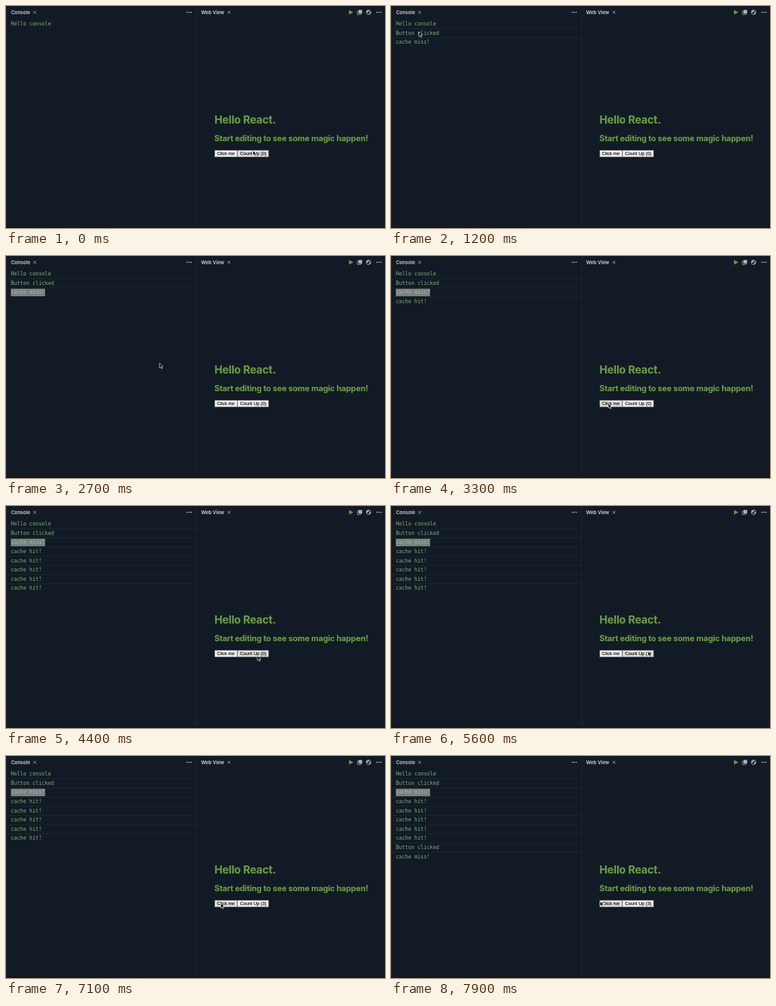
Animation of 600 by 353 pixels, one loop 8 s. Source, as an HTML page:

```html
<!DOCTYPE html>
<html lang="en">
<head>
<meta charset="utf-8">
<title>Console and web view</title>
<style>
  html, body { margin: 0; width: 100%; height: 100%; overflow: hidden; background: #121b25; }
  svg { display: block; width: 600px; height: 353px; }
  text { white-space: pre; }
  .tab { font: 600 7.6px Inter, sans-serif; fill: #ccd3d8; }
  .log { font: 8.15px "DejaVu Sans Mono", monospace; fill: #7fb074; }
  .page { font-family: Inter, sans-serif; font-weight: 700; font-optical-sizing: none; letter-spacing: -.12px; fill: #6a9c41; stroke: #6a9c41; stroke-width: .15; }
  .label { font: 7.3px "Liberation Sans", Arial, sans-serif; fill: #000; stroke: #000; stroke-width: .12; }
  .button { fill: #efefef; stroke: #6c6c6c; stroke-width: .7; }
  .button.hover { fill: #dfdfdf; }
  .icon { fill: #a9b4bc; }
  .stroke { fill: none; stroke: #a9b4bc; stroke-width: .9; }
</style>
</head>
<body>
<svg viewBox="0 0 600 353">
  <defs>
    <path id="close" class="stroke" d="M-2.3-2.3 2.3 2.3M2.3-2.3-2.3 2.3"/>
    <g id="more" class="icon">
      <circle cx="-3.2" r="1"/><circle r="1"/><circle cx="3.2" r="1"/>
    </g>
  </defs>
  <rect width="600" height="353" fill="#121b25"/>
  <path d="M.5 0V351M302 0V351" stroke="#1a2630"/>
  <rect y="351" width="600" height="2" fill="#0f161e"/>

  <text class="tab" x="8" y="12.8">Console</text>
  <use href="#close" x="45.5" y="10"/>
  <use href="#more" x="290" y="10"/>
  <text class="tab" x="308.7" y="12.8">Web View</text>
  <use href="#close" x="353" y="10"/>
  <use href="#more" x="590.5" y="10"/>
  <path d="M543 6.2 550 10 543 13.8Z" fill="#629a3c"/>
  <path class="stroke" d="M557.5 8H556.3V13.6H562V12.4"/>
  <rect class="icon" x="558" y="6.3" width="5.8" height="5.7"/>
  <circle class="stroke" cx="574" cy="10" r="3.7"/>
  <path class="icon" d="M571 8 574.2 6.6 575 8.4 573 9.6 572.4 11 571 10.2ZM575 10 577.4 9.2 576.6 12 574.6 13Z"/>

  <g id="logs"></g>

  <text class="page" x="330" y="187" font-size="16.9">Hello React.</text>
  <text class="page" x="330" y="215" font-size="12.65">Start editing to see some magic happen!</text>
  <rect id="click" class="button" x="330.4" y="229.4" width="35.6" height="10.6"/>
  <rect id="count" class="button" x="366.4" y="229.4" width="49.4" height="10.6"/>
  <text class="label" x="334.1" y="237">Click me</text>
  <text id="total" class="label" x="370.4" y="237">Count Up (0)</text>

  <g id="pointer">
    <g id="ring" fill="none" stroke="#fff">
      <circle cx=".5" cy="1.5" r="10.6" stroke-width=".8" stroke-opacity=".8"/>
      <circle cx=".5" cy="1.5" r="8.4" stroke-width=".7" stroke-opacity=".65"/>
    </g>
    <path d="M0 0V7.6L1.8 6 3.1 8.9 4.5 8.3 3.2 5.5H5.6Z" fill="#000" stroke="#fff" stroke-width=".7" stroke-linejoin="round"/>
  </g>
</svg>
<script>
const LOOP = 8000, STEP = 100, PITCH = 14.6;
const $ = id => document.getElementById(id);

// time, x, y of the pointer tip
const path = [
  [0, 391, 230], [100, 388, 230], [400, 347, 234], [900, 346, 234],
  [1200, 44, 41], [1500, 47, 46], [1800, 57, 53], [2400, 57, 53],
  [2900, 344, 234], [4200, 344, 235], [4400, 398, 238], [4800, 398, 236],
  [5200, 402, 246], [5500, 407, 231], [6700, 407, 230],
  [7100, 340, 234], [7500, 340, 234], [7800, 331, 231], [8000, 331, 231]
];
const logs = [
  [0, "Hello console"], [600, "Button clicked"], [600, "cache miss!"],
  ...[3200, 3500, 3700, 3900, 4100].map(t => [t, "cache hit!"]),
  [7400, "Button clicked"], [7400, "cache miss!"]
];
const selectAt = 2200;
const counts = [5600, 6100, 6600];
const clicks = [...new Set(logs.slice(1).map(l => l[0])), ...counts, 2000, selectAt];

function add(parent, tag, attrs) {
  const el = document.createElementNS("http://www.w3.org/2000/svg", tag);
  for (const key in attrs) el.setAttribute(key, attrs[key]);
  return parent.appendChild(el);
}

const show = (el, on) => { el.style.display = on ? "" : "none"; };

let mark, marked;
const rows = logs.map(([time, words], i) => {
  const row = add($("logs"), "g", { transform: `translate(0 ${i * PITCH})` });
  if (i) add(row, "path", { d: "M0 21.5H302", stroke: "#1b2a35", "stroke-width": .8 });
  if (i === 2) mark = add(row, "rect", { x: 7.7, y: 22.8, width: 54.2, height: 12, fill: "#7b8081" });
  const text = add(row, "text", { class: "log", x: 7.7, y: 31.2 });
  text.textContent = words;
  if (i === 2) marked = text;
  return { row, time };
});

function place(t) {
  const i = Math.max(1, path.findIndex(p => p[0] >= t));
  const [t0, x0, y0] = path[i - 1], [t1, x1, y1] = path[i];
  const u = (t - t0) / (t1 - t0), k = u * u * (3 - 2 * u);
  return [x0 + (x1 - x0) * k, y0 + (y1 - y0) * k];
}

function draw(now) {
  const t = Math.floor(now % LOOP / STEP) * STEP;
  const [x, y] = place(t);
  const over = (a, b) => y >= 229 && y <= 240 && x >= a && x < b;
  rows.forEach(r => show(r.row, t >= r.time));
  show(mark, t >= selectAt);
  marked.style.fill = t >= selectAt ? "#a0b994" : "";
  $("total").textContent = `Count Up (${counts.filter(c => t >= c).length})`;
  $("click").classList.toggle("hover", over(330, 366));
  $("count").classList.toggle("hover", over(366, 416));
  $("pointer").setAttribute("transform", `translate(${x} ${y})`);
  show($("ring"), clicks.some(c => t >= c - STEP && t < c));
}

const start = performance.now();
function tick() {
  draw(performance.now() - start);
  requestAnimationFrame(tick);
}
tick();
</script>
</body>
</html>
```
